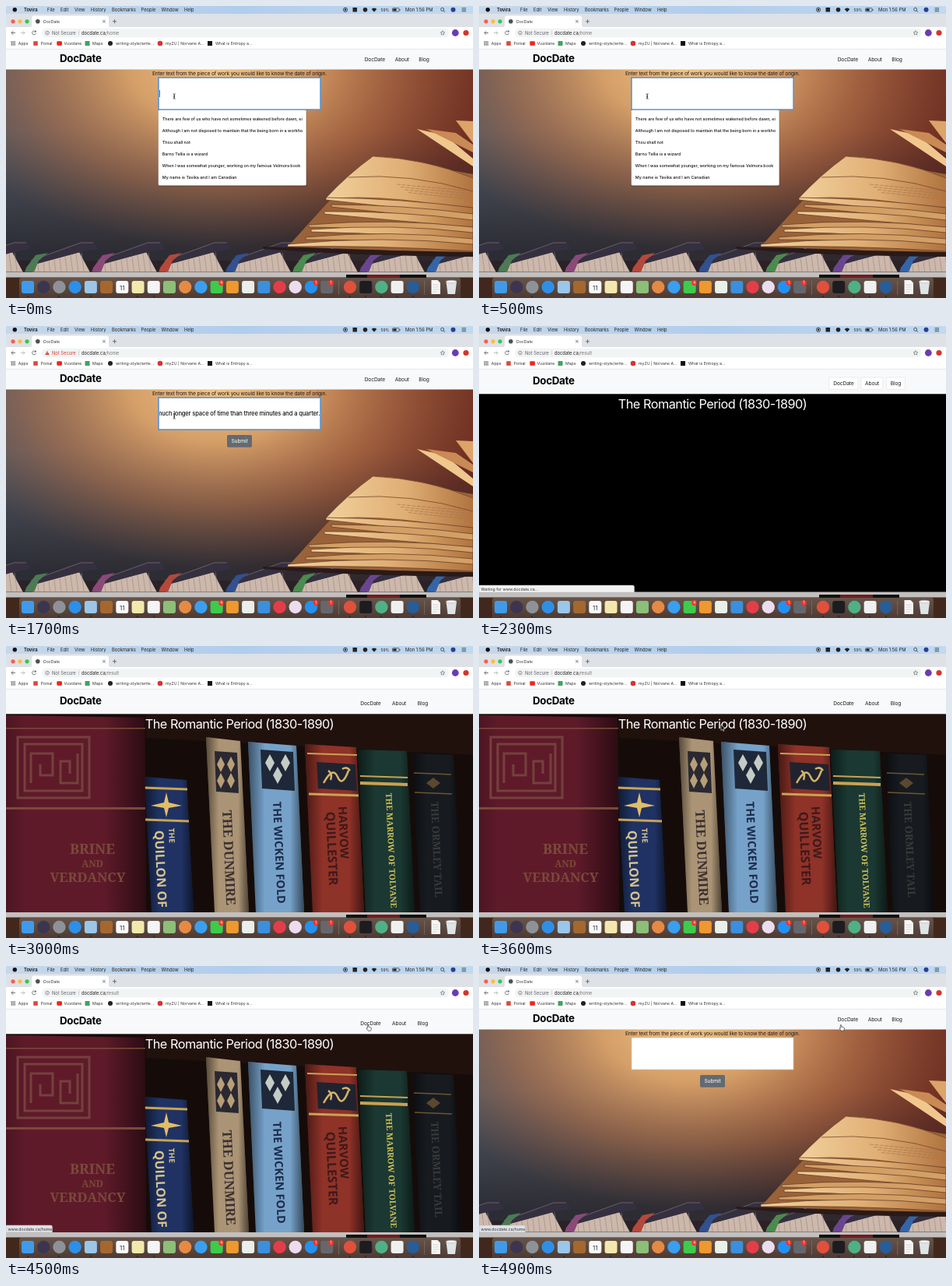
An HTML page for the animation above (5 s loop, 600 by 375 pixels).

```html
<!DOCTYPE html>
<html lang="en">
<head>
<meta charset="utf-8">
<title>DocDate</title>
<style>
html, body { margin: 0; width: 100%; height: 100%; overflow: hidden; background: #000; }
svg { display: block; width: 600px; height: 375px; font-family: Inter, "Open Sans", sans-serif; }
text { white-space: pre; }
.ui { font-size: 5.8px; fill: #222; }
.path { fill: #777; }
.small { font-size: 5.2px; fill: #333; }
.page { font-size: 6.7px; letter-spacing: -.022em; fill: #1a1d20; }
.brand { font-size: 13.3px; font-weight: 700; letter-spacing: -.022em; fill: #000; }
.h1 { font-size: 16.3px; letter-spacing: -.031em; fill: #fff; text-anchor: middle; }
.hint { font-size: 5.35px; font-weight: 500; fill: #111; }
.typed { font-size: 7.5px; font-weight: 500; letter-spacing: -.015em; fill: #111; text-anchor: end; }
.mid { text-anchor: middle; }
.line { fill: none; stroke: #5f6368; stroke-width: .9; }
.thin { stroke-width: .6; }
</style>
</head>
<body>
<svg viewBox="0 0 600 375">
  <defs>
    <linearGradient id="bar">
      <stop offset="0" stop-color="#c6d8ea"/><stop offset=".5" stop-color="#b0cdec"/><stop offset="1" stop-color="#c2d9ef"/>
    </linearGradient>
    <linearGradient id="wall">
      <stop offset="0" stop-color="#555a64"/><stop offset=".45" stop-color="#6d5a51"/>
      <stop offset=".72" stop-color="#7c3f2c"/><stop offset="1" stop-color="#6e2d21"/>
    </linearGradient>
    <radialGradient id="glow" gradientUnits="userSpaceOnUse" cx="270" cy="0" r="370" gradientTransform="translate(0 80) scale(1 .62)">
      <stop offset="0" stop-color="#f3c584"/><stop offset=".3" stop-color="#e0a66a" stop-opacity=".9"/>
      <stop offset=".65" stop-color="#b37149" stop-opacity=".55"/><stop offset="1" stop-color="#8a5038" stop-opacity="0"/>
    </radialGradient>
    <linearGradient id="dusk" x2="0" y2="1">
      <stop offset=".3" stop-color="#23242d" stop-opacity="0"/><stop offset=".9" stop-color="#23242d" stop-opacity=".85"/>
    </linearGradient>
    <linearGradient id="sheet">
      <stop offset="0" stop-color="#f2d09b"/><stop offset=".55" stop-color="#dfae74"/><stop offset="1" stop-color="#b0733f"/>
    </linearGradient>
    <linearGradient id="spine">
      <stop offset="0" stop-opacity=".5"/><stop offset=".3" stop-opacity="0"/>
      <stop offset=".75" stop-opacity="0"/><stop offset="1" stop-opacity=".55"/>
    </linearGradient>
    <linearGradient id="dockFill" x2="0" y2="1">
      <stop offset="0" stop-color="#66544b"/><stop offset="1" stop-color="#4d3b33"/>
    </linearGradient>
    <clipPath id="view"><rect y="81" width="600" height="260.5"/></clipPath>
    <clipPath id="list"><rect x="196" y="134" width="185" height="97"/></clipPath>
    <clipPath id="box"><rect x="197" y="93" width="206.5" height="39"/></clipPath>
  </defs>

  <rect y="341" width="600" height="34" fill="#42281c"/>
  <rect y="341" width="600" height="7.5" fill="#c2c0be"/>
  <rect x="437" y="345" width="103" height="4.5" fill="#111"/>
  <rect x="464" y="345" width="42" height="4.5" fill="#6e1d22"/>

  <g data-on="0-2200 4700-5000">
    <g clip-path="url(#view)">
      <rect y="81" width="600" height="261" fill="url(#wall)"/>
      <rect y="81" width="600" height="261" fill="url(#dusk)"/>
      <rect y="81" width="600" height="261" fill="url(#glow)"/>
      <g id="row"></g>
      <g id="open"></g>
    </g>
    <rect y="55" width="600" height="26.5" fill="#f8f9fa"/>
    <text class="brand" x="69" y="72">DocDate</text>
    <g id="homeNav" class="page"></g>
    <text class="page mid" x="300" y="89">Enter text from the piece of work you would like to know the date of origin.</text>
    <rect x="196" y="92" width="208" height="41" fill="#fff" stroke="#c4c4c8" stroke-width=".7"/>
    <rect x="284" y="140" width="32" height="15.7" rx="1.6" fill="#636a70"/>
    <text class="page mid" x="300" y="150.3" style="fill:#fff">Submit</text>
    <rect data-on="0-2200" x="195.9" y="91.9" width="208.2" height="41.2" fill="none" stroke="#5b93cf" stroke-width="1.6"/>
  </g>

  <g data-on="0-800">
    <rect x="195.3" y="134.2" width="191" height="97.6" rx="2" fill="#000" opacity=".25"/>
    <rect x="195.7" y="133.8" width="190" height="96.8" rx="1.5" fill="#fff"/>
    <g id="hints" clip-path="url(#list)"></g>
    <rect data-on="0-400" x="197.2" y="108" width=".7" height="9" fill="#333"/>
  </g>
  <g data-on="800-2200">
    <text class="typed" x="403.3" y="115.2" clip-path="url(#box)">much longer space of time than three minutes and a quarter.</text>
    <rect data-on="800-1300 1800-2200" x="402.6" y="108.5" width=".7" height="9" fill="#111"/>
  </g>

  <g data-on="2200-4700">
    <rect y="81" width="600" height="260.5" fill="#000"/>
    <g data-on="2600-4700" clip-path="url(#view)" id="shelf"></g>
    <rect y="55" width="600" height="32.3" fill="#f8f9fa"/>
    <text class="brand" x="69" y="74.8">DocDate</text>
    <g data-on="2200-2600" fill="#fff" stroke="#dcdfe3" stroke-width=".6">
      <rect x="449.5" y="66" width="37.5" height="15.5" rx="1.5"/>
      <rect x="491" y="66" width="28" height="15.5" rx="1.5"/>
      <rect x="523.5" y="66" width="24" height="15.5" rx="1.5"/>
    </g>
    <g id="resultNav" class="page"></g>
    <text class="h1" x="300" y="106.3">The Romantic Period (1830-1890)</text>
  </g>

  <g data-on="2200-2600">
    <path d="M0 333H197.5q2 0 2 2V342H0Z" fill="#f1f2f3" stroke="#b8babd" stroke-width=".5"/>
    <text class="small" x="2.5" y="339.5">Waiting for www.docdate.ca...</text>
  </g>
  <g data-on="4300-5000">
    <path d="M0 333H57.5q2 0 2 2V342H0Z" fill="#dee1e6" stroke="#b8babd" stroke-width=".5"/>
    <text class="small" x="2.5" y="339.5">www.docdate.ca/home</text>
  </g>

  <rect width="600" height="10" fill="url(#bar)"/>
  <circle cx="11.3" cy="4.8" r="2.7" fill="#111"/>
  <g id="menu" class="ui"></g>
  <g fill="#222">
    <circle cx="436" cy="4.8" r="2.6" fill="none" stroke="#222" stroke-width=".8"/><circle cx="436" cy="4.8" r="1.2"/>
    <rect x="445.5" y="2" width="5.5" height="5.5"/><circle cx="461.5" cy="4.8" r="2.8"/>
    <path d="M469.6 3.9q3.400-3 6.800 0L473 7.800Z"/>
    <rect x="496.5" y="2.7" width="8.5" height="4.4" rx=".8" fill="none" stroke="#222" stroke-width=".6"/>
    <rect x="497.3" y="3.5" width="4.3" height="2.8"/><rect x="505.6" y="4" width=".8" height="1.8"/>
    <circle cx="560.6" cy="4.3" r="2" fill="none" stroke="#222" stroke-width=".7"/><path d="M562 5.8l1.9 1.9" stroke="#222" stroke-width=".8"/>
    <circle cx="574.5" cy="4.8" r="3" fill="#2b3f8f"/>
    <path d="M585.5 2.8h5.6M585.5 4.8h5.6M585.5 6.8h5.6" stroke="#222" stroke-width=".7"/>
  </g>

  <rect y="10" width="600" height="17.5" fill="#dee1e6"/>
  <circle cx="9" cy="19.8" r="2.6" fill="#fc5b57"/><circle cx="18" cy="19.8" r="2.6" fill="#fdbc40"/><circle cx="27" cy="19.8" r="2.6" fill="#34c84a"/>
  <rect y="27" width="600" height="28.4" fill="#fff"/>
  <path d="M30 27.4q3 0 3-3V15.5q0-3 3-3H129q3 0 3 3V24.4q0 3 3 3Z" fill="#fff"/>
  <circle cx="40.8" cy="19.8" r="2.8" fill="#4d5156"/>
  <text class="small" x="48" y="21.8">DocDate</text>
  <path class="line" d="M124.2 18l3.4 3.4m0-3.4l-3.4 3.4M137 19.8h5m-2.5-2.5v5"/>
  <path class="line" d="M12 34.5H7m2.3-2.4L6.9 34.5l2.4 2.4"/>
  <path class="line" d="M19 34.5h5m-2.3-2.4l2.4 2.4-2.4 2.4" style="stroke:#b5b8bb"/>
  <path class="line" d="M38 33a2.4 2.4 0 1 0 .3 2.2M38.4 31.4v1.9h-1.9"/>
  <rect x="46" y="28.8" width="523" height="11.5" rx="5.7" fill="#f1f3f4"/>
  <g data-on="0-800 2200-5000">
    <circle class="line thin" cx="53" cy="34.5" r="2.3"/><path class="line thin" d="M53 34.2v1.6M53 32.9v.6"/>
    <text class="ui" x="59" y="36.7" style="fill:#5f6368">Not Secure</text>
  </g>
  <g data-on="800-2200">
    <path d="M53 32l2.8 4.9h-5.6Z" fill="#d23f31"/><path d="M53 33.5v1.5M53 35.5v.5" stroke="#fff" stroke-width=".6"/>
    <text class="ui" x="59" y="36.7" style="fill:#d23f31">Not Secure</text>
  </g>
  <path d="M93.5 31.5v6" stroke="#b8bcc0" stroke-width=".6"/>
  <text class="ui" x="97" y="36.7" data-on="0-2200 4700-5000">docdate.ca<tspan class="path">/home</tspan></text>
  <text class="ui" x="97" y="36.7" data-on="2200-4700">docdate.ca<tspan class="path">/result</tspan></text>
  <path class="line thin" d="M561 31.6l.8 2 2.1.1-1.6 1.3.6 2.1-1.9-1.2-1.9 1.2.6-2.1-1.6-1.3 2.1-.1Z"/>
  <circle cx="577.3" cy="34.5" r="4.4" fill="#6a3bb5"/><circle cx="591" cy="34.5" r="3.6" fill="#d9332e"/>
  <g id="marks" class="small"></g>
  <path d="M0 55.3H600" stroke="#d5d7da" stroke-width=".6"/>

  <path d="M17 375V352q0-3 3-3H581q3 0 3 3V375Z" fill="url(#dockFill)"/>
  <g id="dock"></g>

  <path data-on="0-2200" d="M214.7 112.7q1.5 0 1.5 1v4.6q0 1-1.5 1M217.7 112.7q-1.5 0-1.5 1v4.6q0 1 1.5 1M215.4 116.6h1.6" fill="none" stroke="#222" stroke-width=".7"/>
  <g data-on="3300-4000"><path id="arrow" d="M0 0V7.5L1.8 6 3 8.6 4.1 8.1 3 5.5H5.3Z" stroke="#fff" stroke-width=".6"/></g>
  <path data-on="4000-5000" d="M464.3 75.8q.9-.7 1.5.3v2.2q1-.5 1.3.3 1-.4 1.3.4 1-.1 1 .9 0 2-1 3.300h-3.200l-2-3q0-.9 1.1-.3Z" fill="#fff" stroke="#111" stroke-width=".6"/>
</svg>
<script>
const LOOP = 5000;
const $ = id => document.getElementById(id);
const text = (x, y, s, extra = '') => `<text x="${x}" y="${y}" ${extra}>${s}</text>`;
const poly = (pts, fill) => `<polygon points="${pts}" fill="${fill}"/>`;
const rect = (x, y, w, h, fill, rx = 0) => `<rect x="${x}" y="${y}" width="${w}" height="${h}" rx="${rx}" fill="${fill}"/>`;
const disc = (x, y, r, fill) => `<circle cx="${x}" cy="${y}" r="${r}" fill="${fill}"/>`;
const stroke = (d, c, w = .6, extra = '') => `<path d="${d}" fill="none" stroke="${c}" stroke-width="${w}" ${extra}/>`;
const labels = (y, list) => list.map(([x, s]) => text(x, y, s)).join('');
const repeat = (n, make) => Array.from({ length: n }, (_, i) => make(i)).join('');

$('menu').innerHTML = text(23, 6.9, 'Tovira', 'font-weight="700"') + labels(6.9, [
  [53, 'File'], [70, 'Edit'], [88, 'View'], [109, 'History'], [136, 'Bookmarks'], [173.5, 'People'],
  [199.5, 'Window'], [229, 'Help'], [513, 'Mon 1:56 PM']]) + text(481.5, 6.9, '59%', 'font-size="5"');
$('homeNav').innerHTML = labels(71.2, [[460.7, 'DocDate'], [499.7, 'About'], [530.3, 'Blog']]);
$('resultNav').innerHTML = labels(76.3, [[455.3, 'DocDate'], [496, 'About'], [528.7, 'Blog']]);

$('hints').innerHTML = [
  'There are few of us who have not sometimes wakened before dawn, either',
  'Although I am not disposed to maintain that the being born in a workhouse',
  'Thou shall not',
  'Barno Tellis is a wizard',
  'When I was somewhat younger, working on my famous Velmora book',
  'My name is Tavika and I am Canadian'
].map((s, i) => text(200.8, 146.8 + i * 15, s, 'class="hint"')).join('');

$('marks').innerHTML = repeat(9, i => rect(6.5 + i % 3 * 2, 45.2 + (i / 3 | 0) * 2, 1.4, 1.4, '#5f6368'))
  + rect(35.2, 45.2, 5.6, 5.6, '#dc4a3d') + rect(65.3, 45.2, 6.6, 5.6, '#f2231f', 1)
  + rect(101.5, 45, 6, 6, '#3fa55c') + disc(134, 48, 3, '#222') + disc(198, 48, 3.3, '#d9332e')
  + rect(259, 45, 6, 6, '#111') + labels(49.8, [
  [15.8, 'Apps'], [44.5, 'Pomal'], [74.5, 'Vuzolane'], [111, 'Maps'], [141, 'writing-style/write...'],
  [205, 'myZU | Norvane A...'], [269, 'What is Entropy a...']]);

// Dock: kind (s square, c circle) and colour, evenly spaced
const icons = 's#3f9bea c#3b3550 c#8d9299 c#2d8fe6 s#9cc6e8 s#a4682f s#fafafa s#f4e9ac s#f4f4f4 s#8dbf78 c#e58a45 c#3a9ff0 s#3ecb4b s#ee982f s#e9efe9 s#3b8fdc c#e43d4a c#ecdcf0 c#2490ef s#66676c'.split(' ');
const running = 'c#e0503c s#1d1d20 c#4fb088 s#eef0f0 c#285d98'.split(' ');
const icon = (x, s) => s[0] == 's' ? rect(x - 8, 353, 16, 16, s.slice(1), 3) : disc(x, 361, 8.2, s.slice(1));
const badge = (x, n) => disc(x, 355.5, 3.4, '#f0362f') + text(x, 357.3, n, 'class="mid" font-size="5" fill="#fff"');
$('dock').innerHTML = icons.map((s, i) => icon(28 + i * 20.22, s)).join('')
  + running.map((s, i) => icon(442 + i * 20.2, s)).join('')
  + text(149.3, 364.5, '11', 'class="mid" font-size="8" fill="#333"')
  + badge(276.5, 4) + badge(398, 1) + badge(417.5, 1)
  + rect(427, 353, .6, 18, '#8a7a72') + rect(537.5, 353, .6, 18, '#8a7a72')
  + '<path d="M546.5 352h8l3.5 3.5V370h-11.5Z" fill="#f7f7f7"/>' + stroke('M548.5 358h7m-7 3h7m-7 3h7m-7 3h5', '#bbb')
  + '<path d="M565.5 354h13.5l-2 16h-9.5Z" fill="#dfe3e6"/><ellipse cx="572.2" cy="354" rx="6.8" ry="1.7" fill="#f6f7f8" stroke="#aab0b4" stroke-width=".6"/>'
  + [28, 68, 109, 169, 190, 442, 462, 482, 502, 523].map(x => disc(x, 373, .8, '#111')).join('');

// Lying books along the bottom edge
const tints = ['#6c3c86', '#4d7a55', '#8a4a78', '#b5483c', '#33508f', '#4b8a50', '#6a4590', '#3565a8'];
$('row').innerHTML = rect(0, 327, 600, 15, '#2a2226') + tints.map((c, i) => {
  const x = -62 + i * 86;
  return poly([x + 12, 332, x + 70, 316, x + 84, 342, x + 10, 342], '#cdb8ac')
    + repeat(9, k => stroke(`M${x + 17 + k * 7} ${331 - k * 1.8}L${x + 18 + k * 7.3} 342`, '#9c857c'))
    + poly([x + 8, 327, x + 72, 304, x + 88, 303, x + 94, 312, x + 72, 316, x + 12, 332], '#353040')
    + stroke(`M${x + 8} 327L${x + 72} 304H${x + 88}`, '#7b6a70', .8)
    + poly([x + 2, 336, x + 14, 320, x + 30, 317, x + 18, 327, x + 12, 342, x, 342], c);
}).join('');

// Open book: a top page, loose leaves and the fanned stack down to the spine
const leaf = (x, y, yr, drop, fill) =>
  `<path d="M${x} ${y}Q${(x + 600) / 2} ${yr - 12} 600 ${yr}V${yr + drop}Q${(x + 600) / 2} ${yr + drop - 8} ${x} ${y + 3}Z" fill="${fill}" stroke="#5d3420" stroke-width=".7"/>`;
const stack = [[411, 246, 259], [418, 255, 267], [409, 264, 275], [389, 281, 284], [392, 287, 291], [385, 297, 299], [362, 306, 306]];
$('open').innerHTML = poly([472, 193, 600, 216, 600, 318, 362, 309, 410, 256], '#9a6238')
  + poly([578, 147, 600, 148, 600, 176], '#dca468')
  + poly([528, 158, 564, 166, 600, 196, 600, 206], '#f0c88e')
  + poly([540, 158, 578, 163, 600, 178, 600, 188], '#c98a55')
  + '<path d="M472 193Q540 196 600 221V264Q500 240 411 247Q440 216 472 193Z" fill="url(#sheet)"/>'
  + stroke('M472 193Q540 196 600 221M440 220Q520 214 600 238', '#7a4829', .8)
  + stack.map(([x, y, r], i) => leaf(x, y, r, 9, i % 2 ? '#d29f66' : 'url(#sheet)')).join('')
  + repeat(4, i => stroke(`M${502 + i * 5} ${229 + i * 3.500}L590 ${237 + i * 3.500}`, '#9a6f4a', .6, 'stroke-dasharray="5 1.5"'))
  + '<path d="M330 309Q460 314 600 316V322Q450 321 330 312Z" fill="#2a1a18"/>';

// Shelf of spines: corners, colour, gold bands, panel and lettering
const spine = (x1, y1, x2, y2, lean, fill) => {
  const p = [x1, y1, x2, y2, x2 + lean, 342, x1 + lean, 342];
  return poly(p, fill) + poly(p, 'url(#spine)');
};
const band = (x, y, w, h = 2, c = '#c9a253') => stroke(`M${x} ${y}l${w} 2`, c, h);
const down = (x, y, s, size, fill, font = 'Noto Serif, serif') =>
  `<text transform="translate(${x} ${y}) rotate(87.5)" font-size="${size}" font-weight="700" fill="${fill}" font-family="${font}">${s}</text>`;
const gem = (x, y, w, h, c) => poly([x, y - h, x + w, y, x, y + h, x - w, y], c);
const sans = 'Open Sans, sans-serif';
const dim = '#7a4a38';
const title = (x, y, s, size) => text(x, y, s, `class="mid" font-family="Noto Serif, serif" font-weight="700" font-size="${size}" fill="${dim}"`);

$('shelf').innerHTML = rect(0, 81, 600, 261, '#150c0a') + poly([180, 87, 600, 87, 600, 140, 180, 118], '#20110d')
  + spine(522, 138, 575, 140, 10, '#171b20') + band(524, 163, 48, 1.5, '#6b5530') + band(525, 188, 48, 1.5, '#6b5530')
  + gem(549, 176, 9, 7, '#5a4830') + down(546, 200, 'THE ORMLEY TAIL', 13, '#3a3a3a')
  + spine(452, 133, 515, 135, 10, '#1b3832') + band(455, 167, 61, 2) + band(455, 176, 61, 4)
  + down(488, 189, 'THE MARROW OF TOLVANE', 10.5, '#d3c45c')
  + spine(384, 126, 450, 130, 10, '#8f3228') + band(387, 138, 64) + poly([399, 149, 449, 152, 451, 186, 401, 183], '#20232f')
  + band(389, 190, 64, 3) + stroke('M408 176q12-22 18-8t14-8M414 160q6 4 3 12M432 158q6-4 10 2', '#d4b36a', 2.5)
  + down(427, 206, 'HARVOW', 15, '#40191a', sans) + down(411, 213, 'QUILLESTER', 16, '#40191a', sans)
  + spine(311, 123, 373, 128, 10, '#76a2ca') + poly([327, 133, 369, 136, 371, 186, 329, 183], '#1e2838')
  + repeat(3, i => gem(339 + i * 10, 150 + i % 2 * 16, 6, 11, '#c5ccc6'))
  + down(343, 200, 'THE WICKEN FOLD', 14.5, '#1d2b49', sans)
  + spine(257, 117, 301, 122, 11, '#ab9475') + poly([268, 135, 297, 137, 299, 189, 270, 187], '#2a2831')
  + repeat(4, i => gem(276 + i % 2 * 13, 152 + (i >> 1) * 21, 5, 10, '#b79f78'))
  + down(278, 211, 'THE DUNMIRE', 16.5, '#3a3030')
  + spine(178, 168, 232, 172, 9, '#1f3263') + band(178, 182, 55, 3) + band(179, 223, 56, 3)
  + poly([206, 188, 209, 201, 226, 205, 209, 208, 206, 220, 203, 208, 186, 205, 203, 201], '#dfbd69')
  + down(209, 234, 'THE', 10, '#d8c48c', sans) + down(191, 237, 'QUILLON OF', 16, '#d8c48c', sans)
  + spine(-40, 88, 178, 92, 2, '#5f1a2a') + rect(0, 105, 179, 1.5, dim) + rect(0, 207, 179, 3, dim)
  + stroke('M15 117h92v78H15ZM24 126h74v60H24ZM32 176V138h28v28H44v-14M92 138v38H70v-28h12v16', '#74413c', 3)
  + title(111, 267, 'BRINE', 18) + title(111, 284, 'AND', 12) + title(105, 303, 'VERDANCY', 17);

// Hard on/off switching from "from-to" spans in ms
document.querySelectorAll('[data-on]').forEach(el => {
  const spans = el.dataset.on.split(' ').map(s => s.split('-').map(Number));
  const times = [...new Set([0, ...spans.flat(), LOOP])].sort((a, b) => a - b);
  const lit = t => spans.some(([a, b]) => t >= a && t < b) ? 1 : 0;
  el.animate(times.map(t => ({ offset: t / LOOP, opacity: lit(Math.min(t, LOOP - 1)), easing: 'steps(1, end)' })),
    { duration: LOOP, iterations: Infinity });
});

const from = 'translate(216px, 116px)', to = 'translate(465px, 76px)';
$('arrow').animate([
  { offset: 0, transform: from },
  { offset: .66, transform: from, easing: 'ease-in-out' },
  { offset: .8, transform: to },
  { offset: 1, transform: to }
], { duration: LOOP, iterations: Infinity });
</script>
</body>
</html>
```
